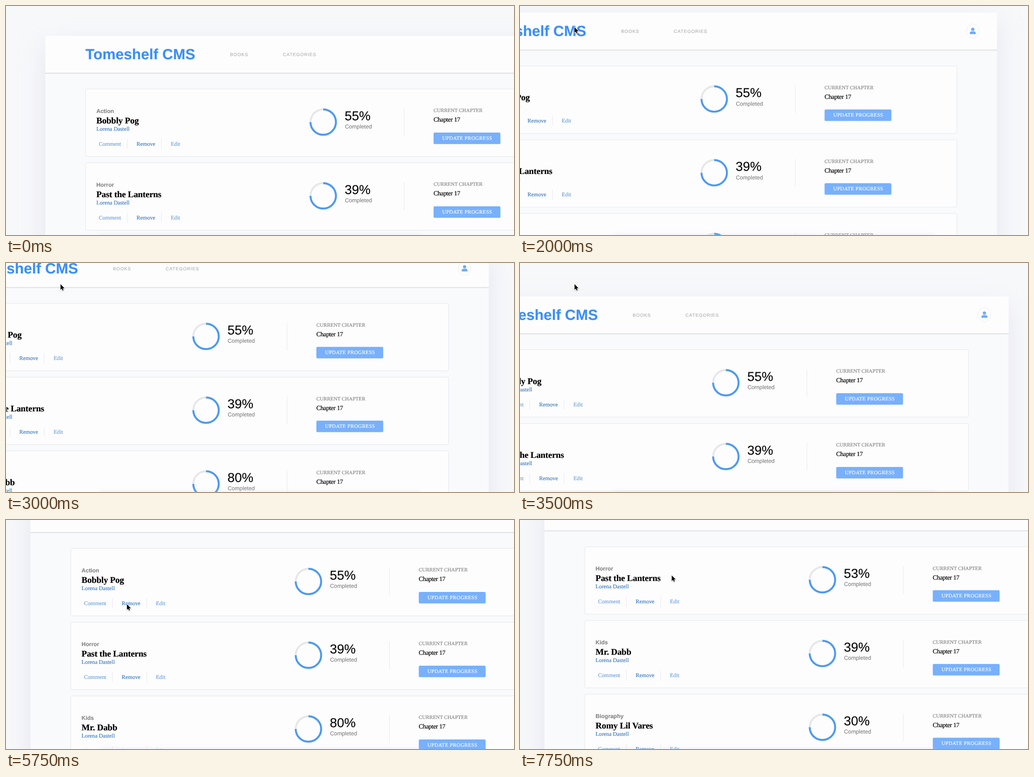
Recreate the animation shown at these times as an HTML page. Size 1113x503 px, loop 8000 ms.

```html
<!DOCTYPE html>
<html lang="en">
<head>
<meta charset="utf-8">
<title>Book list</title>
<style>
  html, body { margin: 0; width: 100%; height: 100%; overflow: hidden; background: #f7f8fa; }
  svg { display: block; width: 100%; height: 100%; }
  text {
    white-space: pre; text-rendering: geometricPrecision;
    font-family: "Liberation Serif", Times, serif; font-size: 12.3px;
    fill: currentColor; stroke: currentColor; stroke-width: .2px;
  }
  .sans { font-family: "Liberation Sans", Helvetica, Arial, sans-serif; }
  .logo { font-size: 32.4px; font-weight: 700; color: #3a8ffa; }
  .nav { font-size: 9.9px; letter-spacing: .95px; color: #b0b0b0; }
  .kind { font-size: 12.4px; font-weight: 700; color: #868686; }
  .title { font-size: 19.2px; font-weight: 700; letter-spacing: -.15px; color: #000; }
  .strong { color: #3d7abf; }
  .link { color: #70a0d5; }
  .pct { font-size: 28.3px; color: #0a0a0a; }
  .note { color: #868686; }
  .label { font-size: 11.35px; color: #848484; }
  .chapter { font-size: 14.1px; letter-spacing: -.4px; color: #000; }
  .btn { font-size: 11.4px; letter-spacing: .36px; color: #fff; }
  .card { fill: #fdfdfe; stroke: #e4e6e9; }
  .rule { stroke: #e7e8ea; }
</style>
</head>
<body>
<svg id="stage" viewBox="0 0 1113 503" preserveAspectRatio="none">
  <defs>
    <filter id="soft" x="-20%" y="-20%" width="140%" height="140%">
      <feGaussianBlur stdDeviation="28"/>
    </filter>
    <filter id="haze" x="-20%" y="-200%" width="140%" height="500%">
      <feGaussianBlur stdDeviation="5"/>
    </filter>
    <filter id="drop" x="-50%" y="-50%" width="200%" height="200%">
      <feDropShadow dx="0" dy="1" stdDeviation=".9" flood-opacity=".3"/>
    </filter>
  </defs>
  <rect width="1113" height="503" fill="#f7f8fa"/>
  <g id="page">
    <rect x="86" y="86" width="1228.5" height="1100" fill="#d5d8e8" opacity=".55" filter="url(#soft)"/>
    <rect x="86" y="65.5" width="1228.5" height="1100" rx="3" fill="#f9fafb"/>
    <path d="M86 147V68.5a3 3 0 0 1 3-3H1311.5a3 3 0 0 1 3 3V147Z" fill="#fdfdfe"/>
    <rect x="86" y="146.3" width="1228.5" height="2.6" fill="#e4e5e8"/>
    <text class="sans logo" x="174" y="116.8">Tomeshelf CMS</text>
    <text class="sans nav" x="491" y="109.6">BOOKS</text>
    <text class="sans nav" x="606.6" y="109.6">CATEGORIES</text>
    <ellipse cx="1261.5" cy="105.5" rx="14" ry="15.5" fill="#fefefe" stroke="#ececf0"/>
    <circle cx="1261.5" cy="102" r="3.6" fill="#6eacf9"/>
    <path d="M1255 112.3v-1.8a4 4 0 0 1 4-4h5a4 4 0 0 1 4 4v1.8Z" fill="#6eacf9"/>
    <g id="cards"></g>
  </g>
  <rect x="205" y="502" width="705" height="8" fill="#c9cce0" opacity=".3" filter="url(#haze)"/>
  <path id="cursor" d="M0 0V12.3L2.8 9.7 4.6 13.9 6.6 13 4.8 8.9H8.7Z" stroke="#fff" stroke-width="1.6" paint-order="stroke" filter="url(#drop)"/>
</svg>
<script>
const LOOP = 8000, STEP = 250, REMOVED_AT = 6500, PITCH = 162;
const AUTHOR = "Lorena Dastell";
const books = [
  ["Action", "Bobbly Pog"],
  ["Horror", "Past the Lanterns"],
  ["Kids", "Mr. Dabb"],
  ["Biography", "Romy Lil Vares"]
];
const before = [55, 39, 80, 64], after = [53, 39, 30];

// Eased moves that add up: [from ms, to ms, dx, dy]
const scroll = [
  [1000, 2000, -269.5, 0],
  [1750, 2500, 0, -195.4],
  [2500, 3500, 25.5, 203.4],
  [3500, 4250, 211.6, -77],
  [4250, 4750, 0, -51],
  [7250, 7750, 0, -3.7]
];
const pointer = [
  [500, 750, -254.5, 13.5],
  [4500, 4750, 25, 60],
  [4750, 5500, 107.5, 109.5],
  [5500, 5750, 13, -31],
  [6500, 7000, 67.5, -63.3]
];

const $ = id => document.getElementById(id);
const text = (cls, x, y, s) => `<text class="${cls}" x="${x}" y="${y}">${s}</text>`;
const rule = (x, y, h) => `<path class="rule" d="M${x} ${y}v${h}"/>`;

function card([kind, title], pct, i) {
  return `<g transform="translate(0 ${i * PITCH})">
    <rect class="card" x="174.5" y="182.5" width="1052" height="148" rx="3"/>
    ${text("sans kind", 198, 235.2, kind)}
    ${text("title", 198, 257.8, title)}
    ${text("strong", 198, 273.6, AUTHOR)}
    ${text("link", 203.4, 307, "Comment")}${rule(265.5, 292, 22)}
    ${text("strong", 286, 307, "Remove")}${rule(340.5, 292, 22)}
    ${text("link", 361, 307, "Edit")}
    <g fill="none" stroke-width="4.2">
      <circle cx="695" cy="255" r="27.9" stroke="#e6e7e8"/>
      <path d="M695 227.1a27.9 27.9 0 1 1-27.9 27.9" stroke="#4d9af0"/>
    </g>
    ${text("sans pct", 742, 250.8, pct + "%")}
    ${text("sans note", 742.4, 269.2, "Completed")}
    ${rule(872.5, 225, 61)}
    ${text("label", 936.7, 233.3, "CURRENT CHAPTER")}
    ${text("chapter", 936.7, 254.3, "Chapter 17")}
    <rect x="936.8" y="278" width="146.4" height="25.2" rx="2.5" fill="#78b0fb"/>
    ${text("btn", 955.8, 293.8, "UPDATE PROGRESS")}
  </g>`;
}

const ease = u => u * u * (3 - 2 * u);

function place(x, y, moves, t) {
  for (const [from, to, dx, dy] of moves) {
    const k = ease(Math.min(1, Math.max(0, (t - from) / (to - from))));
    x += dx * k;
    y += dy * k;
  }
  return `translate(${x.toFixed(2)} ${y.toFixed(2)})`;
}

let removed = null;
function draw(ms) {
  const t = Math.floor((ms % LOOP) / STEP) * STEP;
  const gone = t >= REMOVED_AT;
  if (gone !== removed) {
    removed = gone;
    const list = gone ? books.slice(1) : books, pcts = gone ? after : before;
    $("cards").innerHTML = list.map((b, i) => card(b, pcts[i], i)).join("");
  }
  $("page").setAttribute("transform", place(0, 0, scroll, t));
  $("cursor").setAttribute("transform", place(374, 33, pointer, t));
  $("cursor").style.display = t < STEP ? "none" : "";
}

const start = performance.now();
function tick() {
  draw(performance.now() - start);
  requestAnimationFrame(tick);
}
tick();
</script>
</body>
</html>
```
